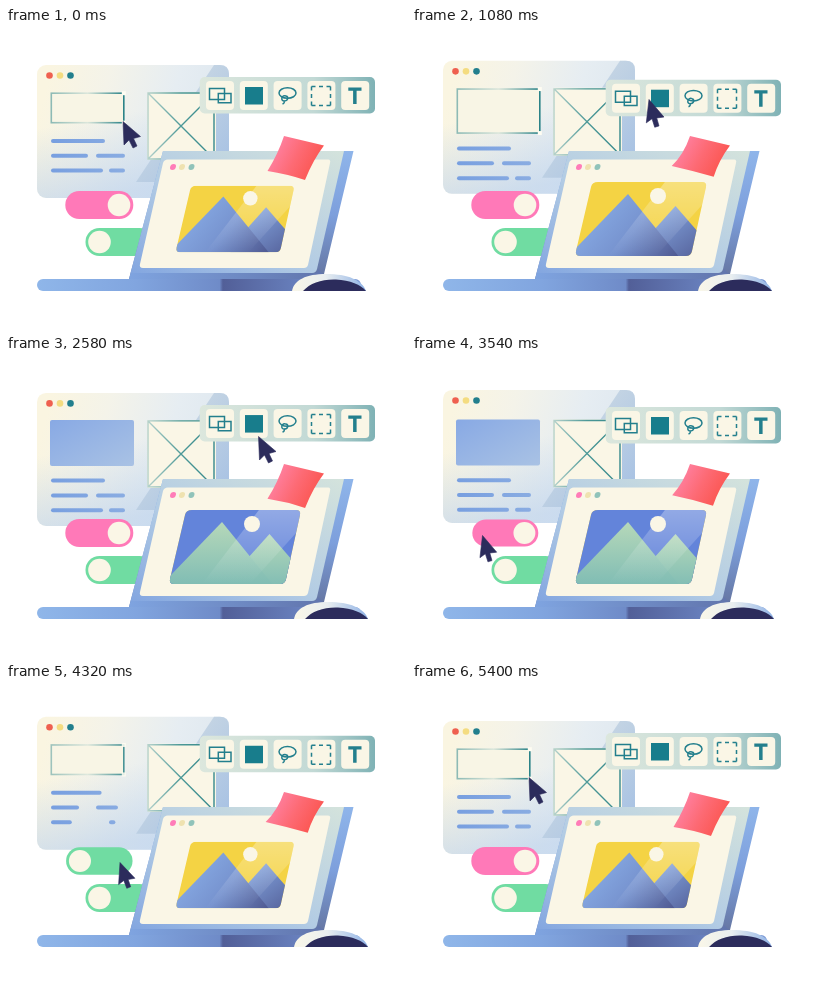
Recreate the animation shown at these times as an HTML page. Size 400x300 px, loop 5.43 s.

```html
<!DOCTYPE html>
<html lang="en">
<head>
<meta charset="utf-8">
<title>Design tools</title>
<style>
html, body { margin: 0; width: 100%; height: 100%; overflow: hidden; background: #fff; }
svg { display: block; width: 100vw; height: 100vh; }
</style>
</head>
<body>
<svg viewBox="0 0 400 300" xmlns="http://www.w3.org/2000/svg">
  <defs>
    <linearGradient id="pane" x1="0" y1=".4" x2="1" y2=".6">
      <stop offset="0" stop-color="#faf5e1"/><stop offset=".3" stop-color="#f4f3e9"/>
      <stop offset=".65" stop-color="#e6edf2"/><stop offset="1" stop-color="#dce6ef"/>
    </linearGradient>
    <linearGradient id="paneFoot" x1="0" y1="0" x2=".25" y2="1">
      <stop offset=".45" stop-color="#b9d0ec" stop-opacity="0"/><stop offset="1" stop-color="#b9d0ec" stop-opacity=".6"/>
    </linearGradient>
    <linearGradient id="paneShade" x1="0" y1="0" x2="1" y2="1">
      <stop offset=".2" stop-color="#c5d4df" stop-opacity=".75"/><stop offset="1" stop-color="#a3bfe4"/>
    </linearGradient>
    <linearGradient id="line" gradientUnits="userSpaceOnUse" x1="45" y1="0" x2="130" y2="0">
      <stop offset="0" stop-color="#789fe0"/><stop offset="1" stop-color="#8caee2"/>
    </linearGradient>
    <linearGradient id="edge" x1="0" y1="0" x2="1" y2="0">
      <stop offset="0" stop-color="#8dbab5"/><stop offset=".5" stop-color="#dbe6db"/><stop offset="1" stop-color="#2a8287"/>
    </linearGradient>
    <linearGradient id="cross" gradientUnits="userSpaceOnUse" x1="142" y1="0" x2="208" y2="0">
      <stop offset="0" stop-color="#b4d1cb"/><stop offset=".5" stop-color="#4b9897"/><stop offset="1" stop-color="#35888b"/>
    </linearGradient>
    <linearGradient id="fill" x1="0" y1="0" x2="1" y2="1">
      <stop offset="0" stop-color="#88a9e4"/><stop offset="1" stop-color="#a9c2e4"/>
    </linearGradient>
    <linearGradient id="bar" x1="0" y1="0" x2="1" y2="0">
      <stop offset="0" stop-color="#dce7dd"/><stop offset=".65" stop-color="#c2d9d5"/><stop offset="1" stop-color="#7fb2b5"/>
    </linearGradient>
    <linearGradient id="lid" gradientUnits="userSpaceOnUse" x1="0" y1="123" x2="0" y2="251">
      <stop offset="0" stop-color="#8fb5ea"/><stop offset=".5" stop-color="#7d9fdc"/><stop offset="1" stop-color="#64749f"/>
    </linearGradient>
    <linearGradient id="hinge" x1="0" y1="0" x2="1" y2="0">
      <stop offset="0" stop-color="#7fa4e0"/><stop offset="1" stop-color="#6175ad"/>
    </linearGradient>
    <linearGradient id="bezel" x1="0" y1="1" x2="1" y2="0">
      <stop offset="0" stop-color="#83a6e0"/><stop offset=".45" stop-color="#b3cce4"/><stop offset="1" stop-color="#d4e3dc"/>
    </linearGradient>
    <linearGradient id="peak" gradientUnits="userSpaceOnUse" x1="190" y1="180" x2="256" y2="236">
      <stop offset="0" stop-color="#84a6e0"/><stop offset=".45" stop-color="#7793cf"/><stop offset="1" stop-color="#515c94"/>
    </linearGradient>
    <linearGradient id="peakBack" gradientUnits="userSpaceOnUse" x1="248" y1="188" x2="280" y2="230">
      <stop offset="0" stop-color="#7f9ed8"/><stop offset="1" stop-color="#58669f"/>
    </linearGradient>
    <linearGradient id="peakGreen" x1="0" y1="0" x2="0" y2="1">
      <stop offset="0" stop-color="#b6d8b9"/><stop offset="1" stop-color="#7fbcb4"/>
    </linearGradient>
    <linearGradient id="shine" x1="0" y1="0" x2="0" y2="1">
      <stop offset="0" stop-color="#fff" stop-opacity=".32"/><stop offset="1" stop-color="#fff" stop-opacity="0"/>
    </linearGradient>
    <linearGradient id="note" x1="0" y1=".3" x2="1" y2=".7">
      <stop offset="0" stop-color="#ff86ac"/><stop offset=".5" stop-color="#fd6a74"/><stop offset="1" stop-color="#fb5148"/>
    </linearGradient>
    <linearGradient id="desk" gradientUnits="userSpaceOnUse" x1="31" y1="0" x2="360" y2="0">
      <stop offset="0" stop-color="#8fb6e9"/><stop offset=".3" stop-color="#81a5df"/><stop offset=".555" stop-color="#6f8bc8"/>
      <stop offset=".565" stop-color="#525f98"/><stop offset=".8" stop-color="#6880bd"/><stop offset="1" stop-color="#7796d6"/>
    </linearGradient>
    <linearGradient id="shell" x1="0" y1="0" x2="1" y2="0">
      <stop offset="0" stop-color="#faf7e8"/><stop offset=".45" stop-color="#e9eef0"/><stop offset="1" stop-color="#8fb2e6"/>
    </linearGradient>
    <clipPath id="shot"><path d="M186 154H290Q295 154 294 159L280 223Q279 228 274 228H168Q163 228 164 223L179 159Q180 154 186 154Z"/></clipPath>
  </defs>

  <g id="window">
    <rect x="31" y="33" width="192" height="133" rx="9" fill="url(#pane)"/>
    <rect x="31" y="33" width="192" height="133" rx="9" fill="url(#paneFoot)"/>
    <path d="M208 33H214Q223 33 223 42V150H130Z" fill="url(#paneShade)"/>
    <circle cx="43.5" cy="43.5" r="3.3" fill="#ef604f"/>
    <circle cx="54" cy="43.5" r="3.3" fill="#f4dc80"/>
    <circle cx="64.5" cy="43.5" r="3.3" fill="#227f8d"/>
    <g id="content">
      <rect x="141" y="60" width="69" height="68" rx="2" fill="#faf6e6"/>
      <path d="M142 61L208 127M208 61L142 127M142 61H208V127H142Z" fill="none" stroke="url(#cross)" stroke-width="1.4"/>
      <rect id="box" x="45.3" fill="#f8f5e5" stroke="url(#edge)" stroke-width="1.6"/>
      <rect id="boxFill" x="44" rx="2" fill="url(#fill)"/>
      <g id="handles" fill="#fffdf2"></g>
      <g id="lines" fill="url(#line)"></g>
    </g>
  </g>

  <g id="toggle">
    <rect id="track" x="59.3" y="163" width="68" height="28" rx="14"/>
    <circle id="knob" cy="177" r="11.3" fill="#faf6e6"/>
  </g>
  <rect x="79.5" y="200" width="68" height="28" rx="14" fill="#70dca2"/>
  <circle cx="93.5" cy="214" r="11.3" fill="#faf6e6"/>

  <g id="toolbar">
    <rect x="193.7" y="49" width="175.3" height="36.5" rx="5" fill="url(#bar)"/>
    <g id="buttons" fill="#faf6e6"></g>
    <g fill="none" stroke="#237f8d" stroke-width="1.5">
      <path d="M203.5 60.5H218.5V71.5H203.5ZM212.3 65.5H225V74.7H212.3Z"/>
      <rect x="239" y="59" width="18" height="17.500" fill="#187d8c" stroke="none"/>
      <ellipse cx="281.500" cy="65" rx="8.500" ry="5.300"/>
      <path d="M280 68C276 66 274 73 278 73C282 73 283 69 280 68M278 73Q279 75 276.500 76"/>
      <rect x="305.500" y="58.500" width="19" height="19" stroke-dasharray="4 3.500 4 3.500 4 0"/>
    </g>
    <path d="M342.300 59.500H355.500V62.700H350.600V76H347.100V62.700H342.300Z" fill="#237f8d"/>
  </g>

  <rect x="31" y="251" width="324" height="12" rx="6" fill="url(#desk)"/>
  <path d="M157 123H347.500L318 246Q317 251 311 251H123Z" fill="url(#lid)"/>
  <path d="M123 251L124.500 245H307Q311 245 312 241L317 246Q316 251 311 251Z" fill="url(#hinge)"/>
  <path d="M157 123H338L311 241Q310 245 306 245H124.500Z" fill="url(#bezel)"/>
  <path d="M162 131.500H322Q325 131.500 324 135L302 237Q301 240 298 240H137Q133 240 134 236L157 135Q158 131.500 162 131.500Z" fill="#faf6e6"/>
  <g transform="translate(0 139) skewX(-13)">
    <circle cx="167" r="2.900" fill="#ff7cb8"/><circle cx="176" r="2.900" fill="#efe2b0"/><circle cx="185.500" r="2.900" fill="#90c3ba"/>
  </g>
  <g id="picture"><g clip-path="url(#shot)">
    <rect x="160" y="150" width="140" height="82" fill="#f4d344"/>
    <path d="M224 222L263.500 178L300 220V232H224Z" fill="url(#peakBack)"/>
    <path d="M160 224L216 166L268 230H160Z" fill="url(#peak)"/>
    <g id="recolor">
      <rect x="160" y="150" width="140" height="82" fill="#6384da"/>
      <g fill="url(#peakGreen)"><path d="M224 222L263.500 178L300 220V232H224Z"/><path d="M160 224L216 166L268 230H160Z"/></g>
    </g>
    <path d="M256 150H300V166L244 228H196Z" fill="url(#shine)"/>
    <circle cx="246" cy="168" r="8" fill="#faf6e6"/>
  </g></g>
  <path id="sticky" fill="url(#note)"/>

  <g id="mouse">
    <path d="M286 263C288 252 300 246 320 246C342 246 356 252 360 263Z" fill="url(#shell)"/>
    <path d="M297 263C304 255 316 251 330 251.500C344 252 355 257 360 263Z" fill="#2c2c5c"/>
  </g>
  <path id="cursor" d="M0 0L1 23.500L6 18.500L10 26.500L14 24.500L10.500 17L17.500 15Z" fill="#2c2c5c" stroke="#2c2c5c" stroke-width=".6" stroke-linejoin="round"/>
</svg>
<script>
const LOOP = 5430, STEP = 30;
const $ = id => document.getElementById(id);
const set = (el, attrs) => { for (const k in attrs) el.setAttribute(k, attrs[k]); };
const mix = (a, b, p) => a + (b - a) * p;
const ease = p => p < .5 ? 4 * p ** 3 : 1 - (2 - 2 * p) ** 3 / 2;
const ramp = (t, a, b) => ease(Math.min(1, Math.max(0, (t - a) / (b - a))));
const pulse = (t, at) => Math.max(0, 1 - Math.abs(t - at) / 120);
const color = (a, b, p) => `rgb(${a.map((v, i) => Math.round(mix(v, b[i], p)))})`;

function add(parent, attrs) {
  const el = document.createElementNS("http://www.w3.org/2000/svg", "rect");
  set(el, attrs);
  return $(parent).appendChild(el);
}

const bars = [[45, 54, 0], [45, 37, 1], [90, 29, 1], [45, 52, 2], [103, 16, 2]].map(
  ([x, width, row]) => ({ width, row, el: add("lines", { x, height: 4, rx: 2 }) }));
const handles = [0, 1].map(() => add("handles", { width: 4, height: 4 }));
for (let i = 0; i < 5; i++) add("buttons", { x: 200 + i * 33.8, y: 53, width: 28, height: 29, rx: 4 });

// Cursor stops: time, x, y, tilt
const stops = [
  [0, 117, 93.5, 0], [180, 117, 93.5, 0], [650, 129, 105, 0], [780, 129, 105, 0],
  [1080, 237, 71.5, 9], [1350, 370, 69, 5], [1800, 251.5, 74.5, 0], [2080, 251.5, 76, 0],
  [2400, 252.5, 80.5, 0], [2850, 252.5, 80.5, 0], [3450, 70.5, 179.5, 9], [3720, 70.5, 179.5, 9],
  [4200, 114, 178.5, 6], [4480, 114, 178.5, 6], [5130, 117, 93.5, 0], [LOOP, 117, 93.5, 0]
];

function cursorAt(t) {
  const i = Math.max(1, stops.findIndex(s => s[0] > t));
  const a = stops[i - 1], b = stops[i];
  // The sweep across the toolbar keeps its speed through 1080 ms.
  let p = (t - a[0]) / (b[0] - a[0]);
  p = b[0] === 1080 ? p * p : a[0] === 1080 ? 1 - (1 - p) ** 2 : ease(p);
  return a.map((v, k) => mix(v, b[k], p)).slice(1);
}

function draw(t) {
  const sway = Math.sin(2 * Math.PI * t / LOOP) ** 2;
  const size = ramp(t, 180, 650) - ramp(t, 3640, 3960);
  const filled = ramp(t, 1960, 2250) - ramp(t, 3620, 3860);
  const flipped = ramp(t, 3600, 3840) - ramp(t, 4380, 4640);

  set($("window"), { transform: `translate(0 ${mix(4, -.6, sway)})` });
  set($("toolbar"), { transform: `translate(0 ${3 * sway})` });
  set($("content"), { transform: `translate(0 ${2.5 * (ramp(t, 3150, 3500) - ramp(t, 3650, 3950))})` });

  const w = mix(72.5, 82.5, size), h = mix(29.5, 44, size);
  const outline = 1 - ramp(t, 3640, 3860) + ramp(t, 3960, 4500);
  set($("box"), { y: 61.2, width: w, height: h, "stroke-opacity": outline * (1 - filled) });
  set($("boxFill"), { y: 60, width: w + 1.5, height: h + 2, opacity: filled });
  handles.forEach((el, i) => set(el, { x: 43.3 + w, y: 59.2 + i * h, opacity: outline * (1 - filled) }));
  for (const { el, width, row } of bars) {
    const grow = 1 - ramp(t, 3560 + row * 30, 3800 + row * 30) + ramp(t, 3900 + row * 80, 4460 + row * 80);
    set(el, { y: mix(107, 118.7, size) + row * 14.8, width: width * grow });
  }

  const squash = 1 - .03 * (pulse(t, 3540) + pulse(t, 4350));
  set($("toggle"), { transform: `translate(93.5 177) scale(${squash}) translate(-93.5 -177)` });
  set($("track"), { fill: color([255, 121, 184], [112, 220, 162], flipped) });
  set($("knob"), { cx: mix(113, 73.5, flipped) });

  const zoom = mix(.9, 1, size);
  set($("picture"), { transform: `translate(229.5 191) scale(${zoom}) translate(-229.5 -191)` });
  set($("recolor"), { opacity: filled });

  const lx = mix(261.5, 259.5, sway), ly = mix(143, 137.5, sway);
  const rx = mix(299, 302, sway), ry = mix(152, 148.5, sway);
  set($("sticky"), { d: `M278 108L318 117.5Q307 132 ${rx} ${ry}Q281 ${ry - 6} ${lx} ${ly}Q272 126 278 108Z` });

  const [x, y, tilt] = cursorAt(t);
  const press = 1 - .1 * (pulse(t, 1950) + pulse(t, 3600) + pulse(t, 4370));
  set($("cursor"), { transform: `translate(${x} ${y}) rotate(${tilt}) scale(${press})` });
  set($("mouse"), { transform: `translate(${2 * (ramp(t, 2000, 2500) - ramp(t, 4480, 5130))} 0)` });
}

const start = performance.now();
function tick(now) {
  const t = Math.max(0, now - start) % LOOP;
  draw(Math.floor(t / STEP) * STEP);
  requestAnimationFrame(tick);
}
draw(0);
requestAnimationFrame(tick);
</script>
</body>
</html>
```
